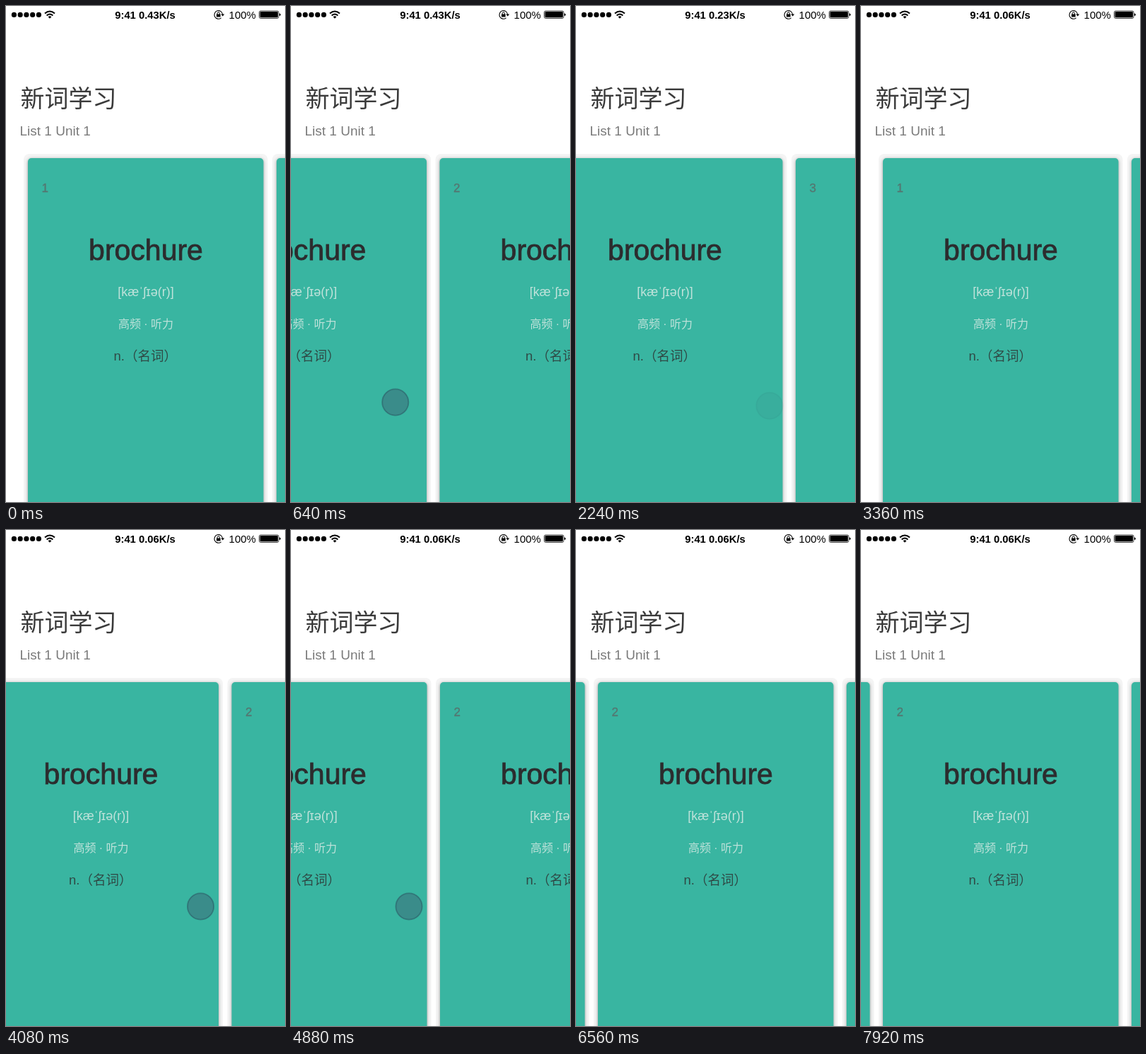
Animation, 395 px wide and 701 px high, one loop 8.08 s. Source, as an HTML page:

```html
<!DOCTYPE html>
<html lang="zh-CN">
<head>
<meta charset="utf-8">
<style>
html, body { margin: 0; width: 100%; height: 100%; overflow: hidden; background: #fff; }
svg { display: block; }
text { font-family: "Liberation Sans", "Noto Sans CJK SC", "Noto Sans CJK", sans-serif; }
.mid { text-anchor: middle; }
.halo { fill: #f4f4f4; }
.face { fill: #39b5a1; filter: drop-shadow(0 1px 2px rgba(0, 0, 0, .38)); }
.num { font-size: 17px; fill: #557670; stroke: #557670; stroke-width: .3px; }
.word { font-size: 41px; fill: #2c2c2e; stroke: #2c2c2e; stroke-width: .8px; }
.sound { font-size: 18px; fill: #bfe2da; }
.tag { font-size: 16px; font-weight: 300; fill: #bfe2da; }
.kind { font-size: 18.5px; fill: #2f4a46; }
.title { font-size: 34px; font-weight: 500; fill: #3a3a3a; }
.unit { font-size: 19px; fill: #7a7a7a; }
.clock { font-size: 14.8px; font-weight: bold; }
.level { font-size: 14.9px; }
</style>
</head>
<body>
<svg id="stage" width="395" height="701" viewBox="0 0 395 701">
  <g id="dots"></g>
  <g fill="none" stroke="#000" stroke-width="2">
    <path d="M55 10.6Q62 4.4 69 10.6"/>
    <path d="M57.6 13.4Q62 9.6 66.4 13.4"/>
  </g>
  <path d="M59.6 15.3Q62 13.3 64.4 15.3L62 17.8Z"/>
  <text class="clock mid" x="197" y="17.6" id="clock"></text>
  <g fill="none" stroke="#000">
    <path d="M304.6 16.8A5.8 5.8 0 1 1 306.6 12" stroke-width="1.1"/>
    <path d="M299.1 12V10.6a1.7 1.7 0 0 1 3.4 0V12"/>
  </g>
  <path d="M298 11.6h5.6v4h-5.6zM304.3 11.4h5l-2.5 3z"/>
  <text class="level" x="315.6" y="17.6">100%</text>
  <rect x="358.5" y="7" width="27.5" height="10.4" rx="2" fill="none" stroke="#000" stroke-width=".8"/>
  <rect x="359.6" y="8.1" width="25.3" height="8.2" rx="1"/>
  <path d="M387 10.3q1.8 .4 1.8 1.9t-1.8 1.9z"/>
  <text class="title" x="20.5" y="143">新词学习</text>
  <text class="unit" x="19.5" y="183">List 1 Unit 1</text>
  <g id="cards"></g>
  <circle id="touch" r="18.6" fill="rgba(60,90,110,.45)" stroke="rgba(40,80,95,.5)" stroke-width="1.8"/>
</svg>
<script>
const LOOP = 8080, STEP = 80, PITCH = 352, TAU = 130, FADE = 48;
const byId = id => document.getElementById(id);

// Each drag: [time, scroll] points, snap goal, touch start x and y.
const quick = p => p * p;
const gentle = p => p * p * (3 - 2 * p);
const drags = [
  { path: [[80, 0], [720, 225]], goal: 704, x: 320, y: 560, ease: quick },
  { path: [[1760, 704], [2200, 577]], goal: 0, x: 147, y: 565, ease: quick },
  { path: [[3520, 0], [4880, 172], [5600, 164]], goal: 352, x: 339, y: 532, ease: gentle }
];
const speeds = [[0, '0.43'], [880, '0.06'], [1840, '0.23'], [2720, '0.06']];

byId('dots').innerHTML = [0, 1, 2, 3, 4]
  .map(i => `<circle cx="${11.4 + i * 8.75}" cy="12.4" r="3.6"/>`).join('');

byId('cards').innerHTML = [1, 2, 3, 4].map(n => `
  <g transform="translate(${31 + (n - 1) * PITCH} 0)">
    <rect class="halo" x="-6" y="209" width="345.5" height="520" rx="8"/>
    <rect class="face" y="215" width="333.5" height="520" rx="5"/>
    <text class="num" x="19.5" y="263">${n}</text>
    <text class="word mid" x="167" y="358.5">brochure</text>
    <text class="sound mid" x="167" y="410">[kæˈʃɪə(r)]</text>
    <text class="tag mid" x="167" y="454.5">高频 · 听力</text>
    <text class="kind mid" x="166.3" y="501">n.（名词）</text>
  </g>`).join('');

function along(path, ease, t) {
  for (let i = 1; i < path.length; i++) {
    const [t0, a] = path[i - 1], [t1, b] = path[i];
    if (t <= t1) return a + (b - a) * ease((t - t0) / (t1 - t0));
  }
  return path[path.length - 1][1];
}

function pose(t) {
  const d = drags.filter(d => t >= d.path[0][0]).pop();
  if (!d) return { scroll: 0, x: 0, y: 0, alpha: 0 };
  const [begin, first] = d.path[0];
  const since = t - d.path[d.path.length - 1][0];
  const held = along(d.path, d.ease, t);
  const scroll = since > 0 ? d.goal + (held - d.goal) * Math.exp(-since / TAU) : held;
  const alpha = since > 0 ? Math.max(0, 1 - since / FADE) : Math.min(1, (t - begin) / 160);
  return { scroll, x: d.x - held + first, y: d.y, alpha };
}

function draw(now) {
  const t = Math.floor((now % LOOP) / STEP) * STEP;
  const p = pose(t), touch = byId('touch');
  byId('cards').setAttribute('transform', `translate(${-Math.round(p.scroll * 2) / 2} 0)`);
  touch.setAttribute('cx', p.x);
  touch.setAttribute('cy', p.y);
  touch.setAttribute('opacity', p.alpha);
  byId('clock').textContent = `9:41 ${speeds.filter(s => t >= s[0]).pop()[1]}K/s`;
}

let start;
function tick(now) {
  start ??= now;
  draw(now - start);
  requestAnimationFrame(tick);
}
draw(0);
requestAnimationFrame(tick);
</script>
</body>
</html>
```
